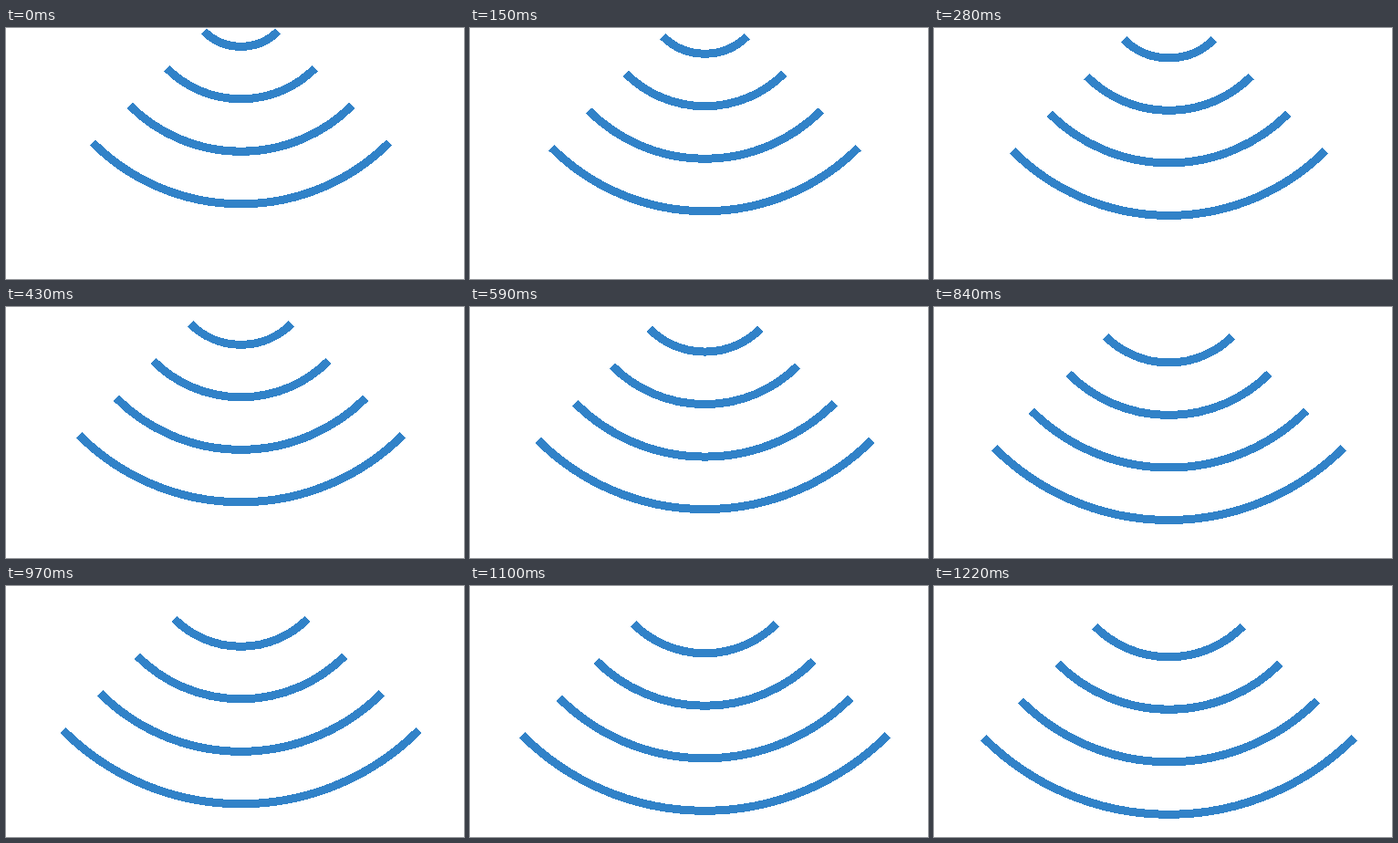
Write an HTML page that moves like this. It is 502 by 275 pixels and loops after 1.25 s.

```html
<!DOCTYPE html>
<html lang="en">
<head>
<meta charset="utf-8">
<title>Signal waves</title>
<style>
  html, body { margin: 0; width: 100%; height: 100%; overflow: hidden; background: #fff; }
  svg { display: block; width: 100%; height: 100%; }
</style>
</head>
<body>
<svg viewBox="0 0 502 275" fill="none" stroke="#3182c8" stroke-width="9" shape-rendering="crispEdges">
  <path id="waves"/>
</svg>
<script>
const LOOP = 1250, GAP = 57.5, CX = 257.5, CY = -37.2;
const waves = document.getElementById('waves');

// Moments at which the picture advances, two similar runs per loop
const run = [50, 50, 50, 50, 50, 30, 50, 50, 50, 50, 30];
const steps = [0];
for (const start of [50, 590]) {
  let t = start;
  steps.push(t);
  for (const d of run) steps.push(t += d);
}
steps.push(1170, 1220);

// Time and outward travel
const travel = [[0, 0], [150, 7.9], [430, 21], [590, 28.8], [740, 36.6], [970, 46], [1100, 53.5], [1220, GAP]];

function growth(t) {
  let i = 1;
  while (i < travel.length - 1 && t > travel[i][0]) i++;
  const [t0, r0] = travel[i - 1], [t1, r1] = travel[i];
  return r0 + (r1 - r0) * (t - t0) / (t1 - t0);
}

function arc(r) {
  const d = r * Math.SQRT1_2;
  return `M${CX - d} ${CY + d}A${r} ${r} 0 0 0 ${CX + d} ${CY + d}`;
}

function draw(ms) {
  const t = ms % LOOP;
  const held = steps.filter(s => s <= t).pop();
  const g = growth(held);
  waves.setAttribute('d', [1, 2, 3, 4].map(n => arc(n * GAP + g)).join(''));
}

const start = performance.now();
function tick() {
  draw(performance.now() - start);
  requestAnimationFrame(tick);
}
tick();
</script>
</body>
</html>
```
